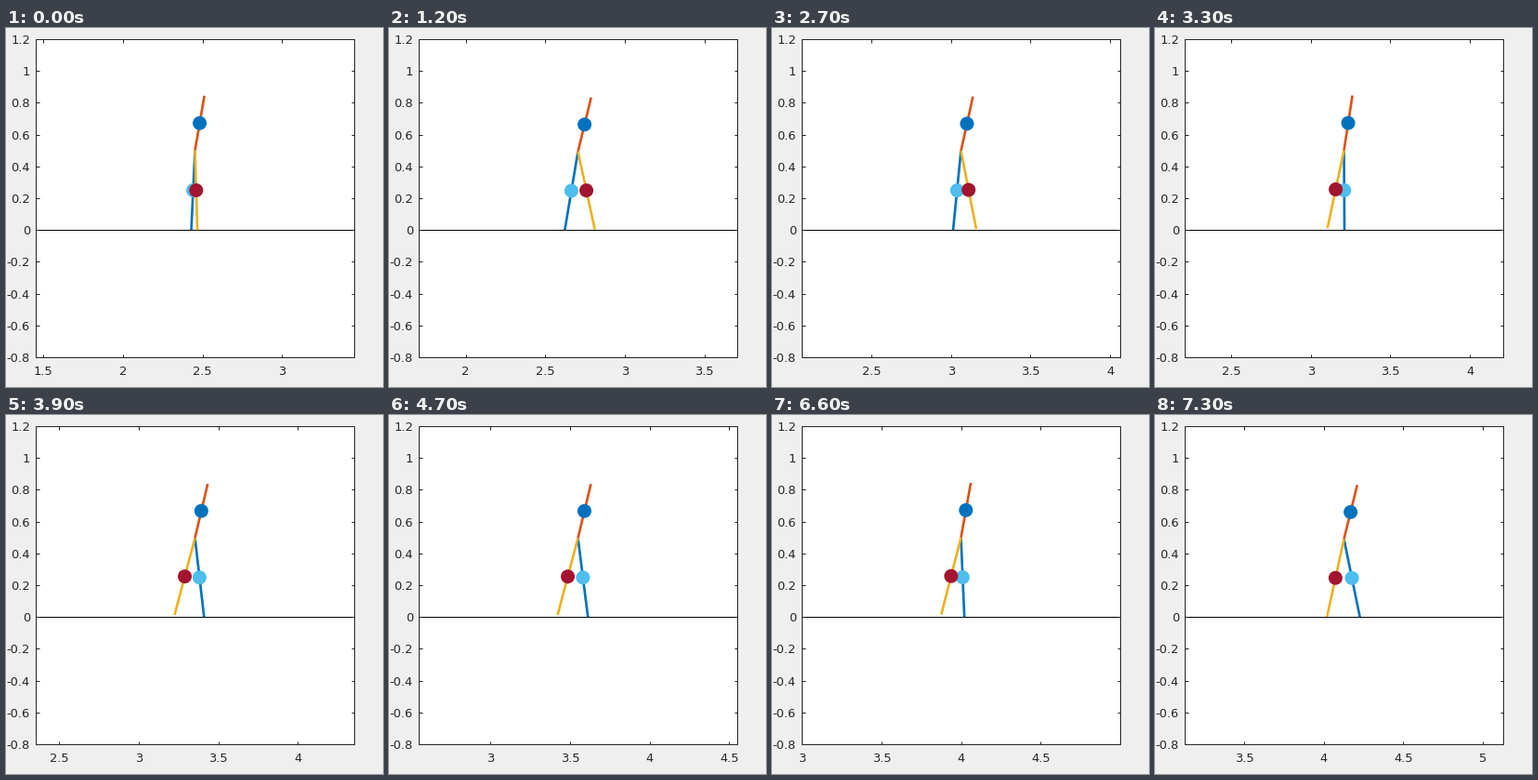
A matplotlib script that plays this animation: 406 by 386 pixels, repeating every 7.4 s.

```python
import math

import matplotlib.pyplot as plt
import numpy as np
from matplotlib.animation import FuncAnimation
from matplotlib.patches import Circle, Rectangle

W, H, DPI = 406, 386, 64
PT = 72 / DPI                      # points per pixel
FRAMES, INTERVAL = 74, 100

LEFT, RIGHT, TOP, BOTTOM = 32, 375, 12, 354
SX, SY = (RIGHT - LEFT) / 2, (BOTTOM - TOP) / 2
MID = (LEFT + RIGHT) / 2
TICK = 3.5
LEG, TORSO = 0.5, 0.35

BLUE, ORANGE, YELLOW = "#0072BD", "#D95319", "#EDB120"
CYAN, MAROON = "#4DBEEE", "#A2142F"
INK = "#262626"

# the walk's uneven pace: hip x at a few key frames
KEY_FRAMES = (0, 3, 8, 12, 27, 39, 55, 66, 73)
KEY_HIPS = (2.453, 2.534, 2.646, 2.7055, 3.063, 3.354, 3.746, 3.999, 4.127)


def foothold(k):
    """Ground contact of step k; strides lengthen slowly."""
    return 2.43 + 0.192 * k + 0.00085 * k * k


def impact(k):
    """Hip x at which the stance passes from step k to the next."""
    return (foothold(k) + foothold(k + 1)) / 2


def swing_reach(s):
    """Swing foot relative to the hip, for hip offset s from the stance foot."""
    return -0.011 + 0.117 * math.tanh((s - 0.0185) / 0.02)


def torso_lean(s):
    return 0.24 - 0.09 * math.exp(-((s - 0.003) / 0.04) ** 2)


def py(y):
    return TOP + (1.2 - y) * SY


fig = plt.figure(figsize=(W / DPI, H / DPI), dpi=DPI, facecolor="#efefef")
ax = fig.add_axes([0, 0, 1, 1])
ax.set_xlim(0, W)
ax.set_ylim(H, 0)
ax.axis("off")


def line(color, width, z, xs=(), ys=()):
    return ax.plot(xs, ys, color=color, lw=width * PT, zorder=z,
                   solid_capstyle="butt")[0]


def dot(color, z):
    return ax.add_patch(Circle((0, 0), 7.5, fc=color, ec="none", zorder=z))


def label(x, y, text, ha):
    return ax.text(x, y, text, ha=ha, va="baseline", color=INK,
                   family="DejaVu Sans", size=13 * PT, zorder=9)


def box(fill, edge, z):
    ax.add_patch(Rectangle((LEFT, TOP), RIGHT - LEFT, BOTTOM - TOP,
                           fc=fill, ec=edge, lw=PT, zorder=z))


box("white", "none", 0)
box("none", INK, 8)
line("black", 1, 1, [LEFT, RIGHT], [217, 217])

for i in range(-4, 7):
    y = py(i / 5)
    label(26, y + 5, f"{i / 5:g}", "right")
    line(INK, 1, 8, [LEFT, LEFT + TICK], [y, y])
    line(INK, 1, 8, [RIGHT - TICK, RIGHT], [y, y])

stance, torso, swing = [line(c, 2.67, z) for c, z in
                        ((BLUE, 2), (ORANGE, 3), (YELLOW, 4))]
stance_dot, swing_dot, torso_dot = [dot(c, z) for c, z in
                                    ((CYAN, 5), (MAROON, 6), (BLUE, 7))]

xticks = [(line(INK, 1, 8), line(INK, 1, 8), label(0, 0, "", "center"))
          for _ in range(5)]


def place_ticks(hip):
    first = math.ceil((hip - 1) * 2)
    for i, (low, high, text) in enumerate(xticks):
        value = (first + i) / 2
        x = MID + (value - hip) * SX
        low.set_data([x, x], [BOTTOM - TICK, BOTTOM])
        high.set_data([x, x], [TOP, TOP + TICK])
        text.set_position((x, 373))
        text.set_text(f"{value:g}")
        for part in (low, high, text):
            part.set_visible(value <= hip + 1)


def place_limb(limb, mass, hip_y, dx, dy):
    x, y0, y1 = MID + dx * SX, py(hip_y), py(hip_y + dy)
    limb.set_data([MID, x], [y0, y1])
    mass.set_center(((MID + x) / 2, (y0 + y1) / 2))


def drop(dx):
    """Height of a leg's foot below the hip, as a negative number."""
    return -math.sqrt(LEG ** 2 - dx ** 2)


def draw(frame):
    hip = float(np.interp(frame, KEY_FRAMES, KEY_HIPS))
    k = 0
    while hip > impact(k):
        k += 1
    s = hip - foothold(k)
    hip_y = -drop(s)
    # the rear foot stays planted until the swing lifts it
    reach = max(swing_reach(s), foothold(k - 1) - hip)
    lean = torso_lean(s)

    place_ticks(hip)
    place_limb(stance, stance_dot, hip_y, -s, drop(s))
    place_limb(swing, swing_dot, hip_y, reach, drop(reach))
    place_limb(torso, torso_dot, hip_y,
               TORSO * math.sin(lean), TORSO * math.cos(lean))
    return []


anim = FuncAnimation(fig, draw, frames=FRAMES, interval=INTERVAL,
                     init_func=lambda: draw(0), repeat=True, repeat_delay=0)
plt.show()
```
